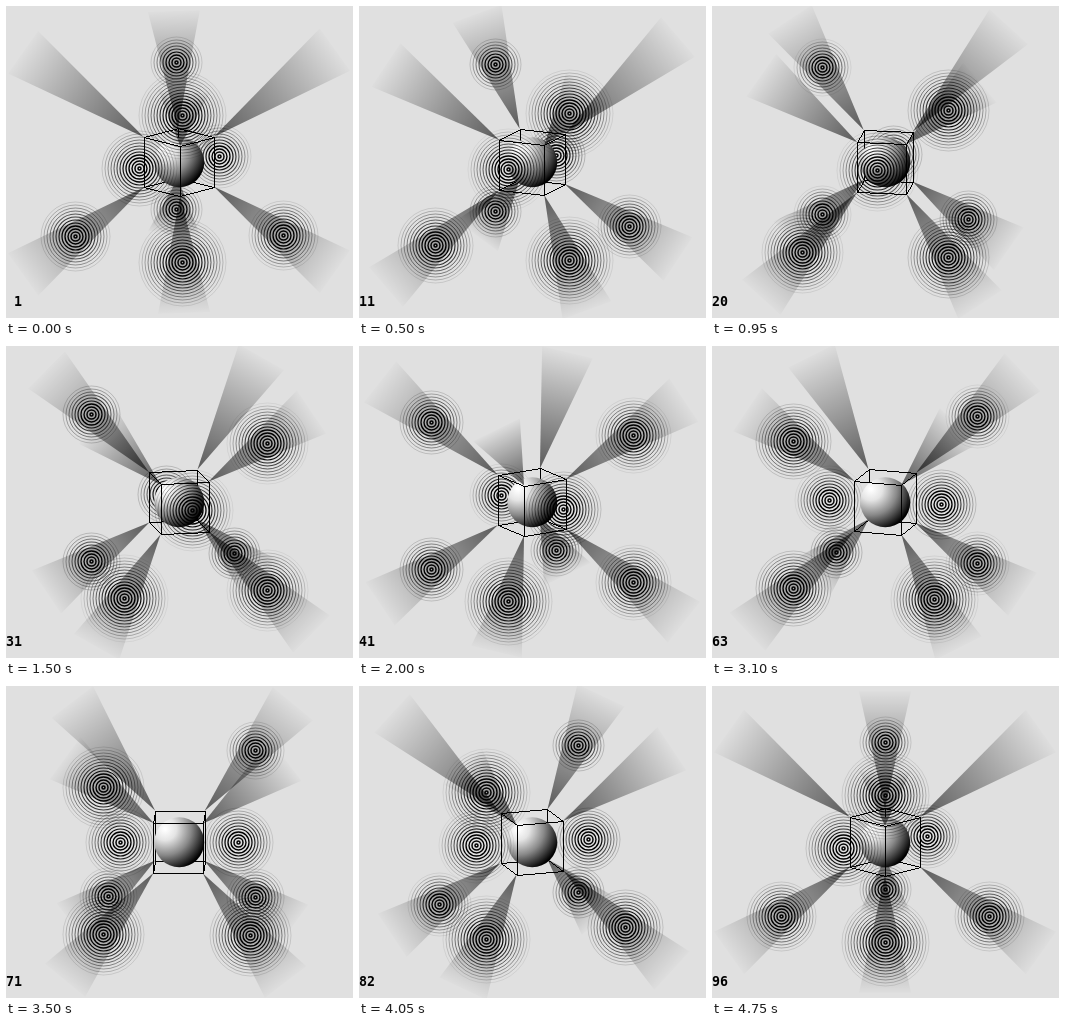
Write an HTML page with a canvas that moves like this. It is 347x312 px and loops after 4.8 s.

```html
<!DOCTYPE html>
<html lang="en">
<head>
<meta charset="utf-8">
<title>Rotating cube</title>
<style>
html, body { margin: 0; width: 100%; height: 100%; overflow: hidden; background: #e0e0e0; }
canvas { display: block; }
</style>
</head>
<body>
<canvas id="stage" width="347" height="312"></canvas>
<script>
const ctx = document.getElementById('stage').getContext('2d');
const STEPS = 96, STEP_MS = 50, CX = 173, CY = 156, TAU = Math.PI * 2;

// Point on a tilted turntable: radius, height, tilt, angle.
function orbit(radius, height, tilt, angle) {
  const z = Math.cos(angle);
  return { x: CX + radius * Math.sin(angle), y: CY + height + radius * tilt * z, z };
}

// Hard-edged line, one pixel wide.
function line(a, b) {
  const [x, y, u, v] = [a.x, a.y, b.x, b.y].map(Math.round);
  const n = Math.max(Math.abs(u - x), Math.abs(v - y), 1);
  ctx.fillStyle = '#000';
  for (let i = 0; i <= n; i++) {
    ctx.fillRect(Math.round(x + (u - x) * i / n), Math.round(y + (v - y) * i / n), 1, 1);
  }
}

// Rings keep their spacing; a larger size shows more of them.
function rings(p, size) {
  const x = Math.round(p.x) + 0.5, y = Math.round(p.y) + 0.5;
  for (let r = 1.5; r < size; r += 3) {
    const k = r / size;
    ctx.lineWidth = 1 + 0.6 * Math.max(0, 1 - 1.6 * k);
    ctx.strokeStyle = `rgba(0,0,0,${Math.min(1, 1.55 - 1.5 * k)})`;
    ctx.beginPath();
    ctx.arc(x, y, r, 0, TAU);
    ctx.stroke();
  }
}

function beam(a, b) {
  const dx = b.x - a.x, dy = b.y - a.y, k = 26 / Math.hypot(dx, dy);
  const fill = ctx.createLinearGradient(a.x, a.y, b.x, b.y);
  fill.addColorStop(0, 'rgba(0,0,0,.6)');
  fill.addColorStop(1, 'rgba(0,0,0,.01)');
  ctx.fillStyle = fill;
  ctx.beginPath();
  ctx.moveTo(a.x, a.y);
  ctx.lineTo(b.x - dy * k, b.y + dx * k);
  ctx.lineTo(b.x + dy * k, b.y - dx * k);
  ctx.fill();
}

function ball() {
  const fill = ctx.createRadialGradient(CX - 14, CY - 13, 1, CX - 14, CY - 13, 43);
  fill.addColorStop(0, '#fff');
  fill.addColorStop(0.25, '#e4e4e4');
  fill.addColorStop(0.6, '#888');
  fill.addColorStop(1, '#000');
  ctx.fillStyle = fill;
  ctx.beginPath();
  ctx.arc(CX + 0.25, CY + 0.25, 25, 0, TAU);
  ctx.fill();
}

function draw(step) {
  const turn = (step + 1) * Math.PI / STEPS;
  const parts = [{ z: 0, paint: ball }];
  const add = (z, paint) => parts.push({ z, paint });

  for (let i = 0; i < 4; i++) {
    const angle = turn + i * Math.PI / 2, next = angle + Math.PI / 2;
    const corner = (side, a) => orbit(35, side * 25, 0.25, a);
    for (const side of [-1, 1]) {
      const p = corner(side, angle), q = corner(side, next);
      const node = orbit(104, side * 73.5, 0.255, angle);
      const tip = orbit(156, side * 111, 0.255, angle);
      add(p.z, () => beam(p, tip));
      if (side > 0 || i % 2 === 0) add(p.z + 0.001, () => rings(node, 36 + 9 * p.z));
      add((p.z + q.z) / 2, () => line(p, q));
    }
    const top = corner(-1, angle);
    add(top.z, () => line(top, corner(1, angle)));
  }
  for (const half of [0, Math.PI]) {
    const p = orbit(59, 0, 0.133, turn - Math.PI / 4 + half);
    add(p.z, () => rings(p, 36 + 5 * p.z));
  }

  ctx.fillStyle = '#e0e0e0';
  ctx.fillRect(0, 0, 347, 312);
  parts.sort((a, b) => a.z - b.z).forEach(part => part.paint());

  ctx.fillStyle = '#000';
  ctx.font = 'bold 13.3px "DejaVu Sans Mono", monospace';
  ctx.textAlign = 'right';
  ctx.fillText(step + 1, 16, 300);
}

let shown = -1;
function tick() {
  const step = Math.floor(performance.now() / STEP_MS) % STEPS;
  if (step !== shown) draw(shown = step);
  requestAnimationFrame(tick);
}
tick();
</script>
</body>
</html>
```
